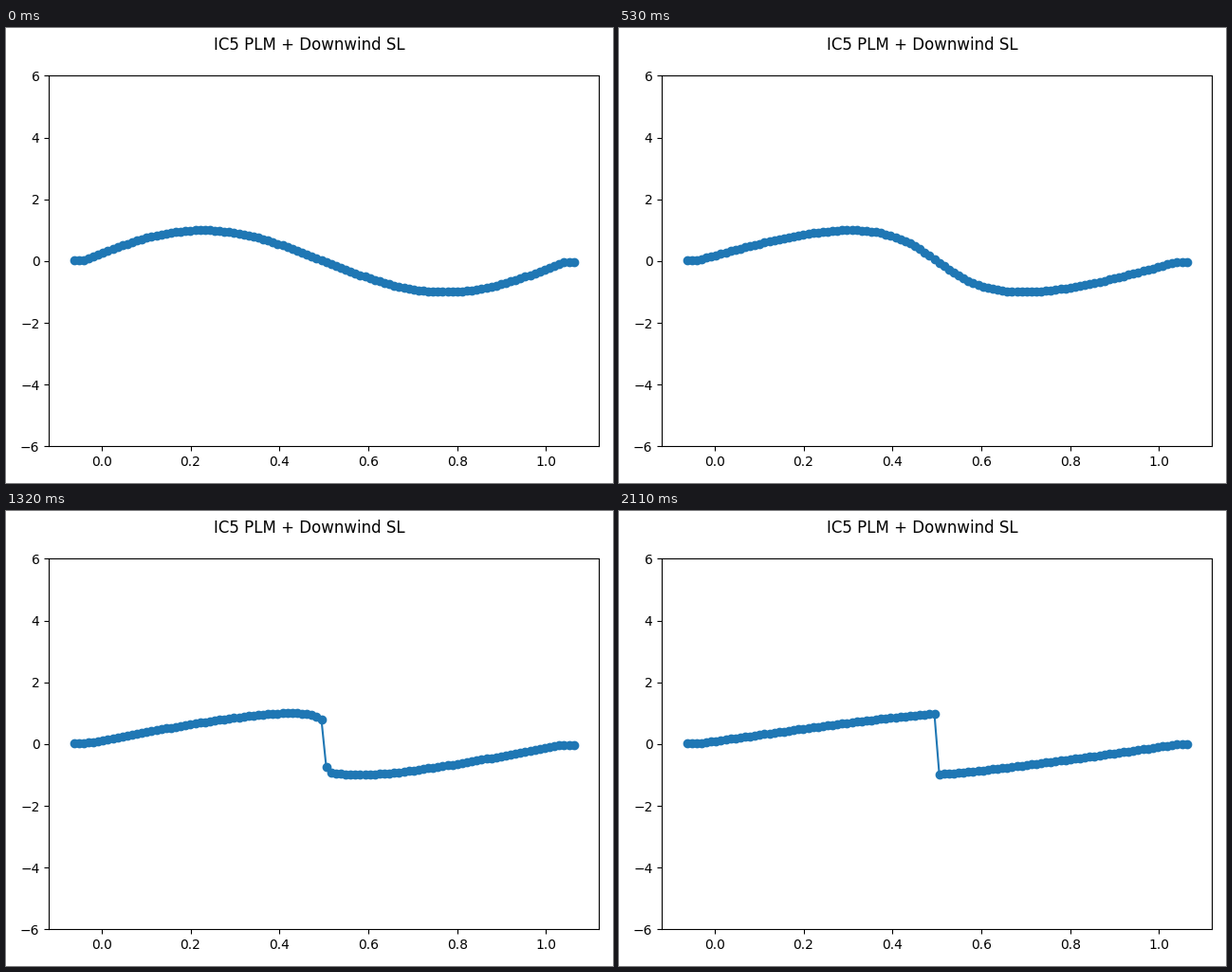
A matplotlib script that plays this animation: 640x480 px, repeating every 2.18 s.

```python
import matplotlib.pyplot as plt
import numpy as np
from matplotlib.animation import FuncAnimation

CELLS, GHOSTS = 100, 2
CFL = 0.9
STEPS = 33
TICKS, TICK_MS = 218, 10
HEIGHT = 480


def fill_ghosts(u):
    """Zero-gradient boundaries."""
    u[:GHOSTS] = u[GHOSTS]
    u[-GHOSTS:] = u[-GHOSTS - 1]
    return u


def godunov_flux(left, right):
    """Exact Riemann flux for Burgers' equation."""
    return np.maximum(np.maximum(left, 0) ** 2, np.minimum(right, 0) ** 2) / 2


def advance(u):
    """One piecewise-linear step with one-sided slopes."""
    nu = CFL / np.abs(u).max()
    slope = np.diff(u, prepend=u[0])
    left = u + 0.5 * (1 - nu * u) * slope
    right = u - 0.5 * (1 + nu * u) * slope
    flux = godunov_flux(left[:-1], right[1:])
    new = u.copy()
    new[1:-1] -= nu * np.diff(flux)
    return fill_ghosts(new)


def solve():
    centers = np.arange(-GHOSTS, CELLS + GHOSTS) + 0.5
    states = [fill_ghosts(np.sin(2 * np.pi * centers / CELLS))]
    while len(states) < STEPS:
        states.append(advance(states[-1]))
    return states


def from_top(px):
    """Figure fraction of a distance below the top edge."""
    return 1 - px / HEIGHT


states = solve()
x = np.linspace(-1 / 16, 17 / 16, CELLS + 2 * GHOSTS)

fig, ax = plt.subplots(figsize=(6.4, HEIGHT / 100), dpi=100)
line, = ax.plot(x, states[0], "-o")
ax.set_ylim(-6, 6)
fig.tight_layout()
fig.subplots_adjust(top=from_top(50.4), bottom=from_top(441.4))
fig.suptitle("IC5 PLM + Downwind SL", y=from_top(23), va="baseline")


def update(tick):
    # step times are rounded to the nearest tick
    step = int((tick + 0.5) * STEPS / TICKS)
    line.set_ydata(states[step])
    return line,


anim = FuncAnimation(fig, update, frames=TICKS, interval=TICK_MS,
                     repeat=True, repeat_delay=0)
plt.show()
```
